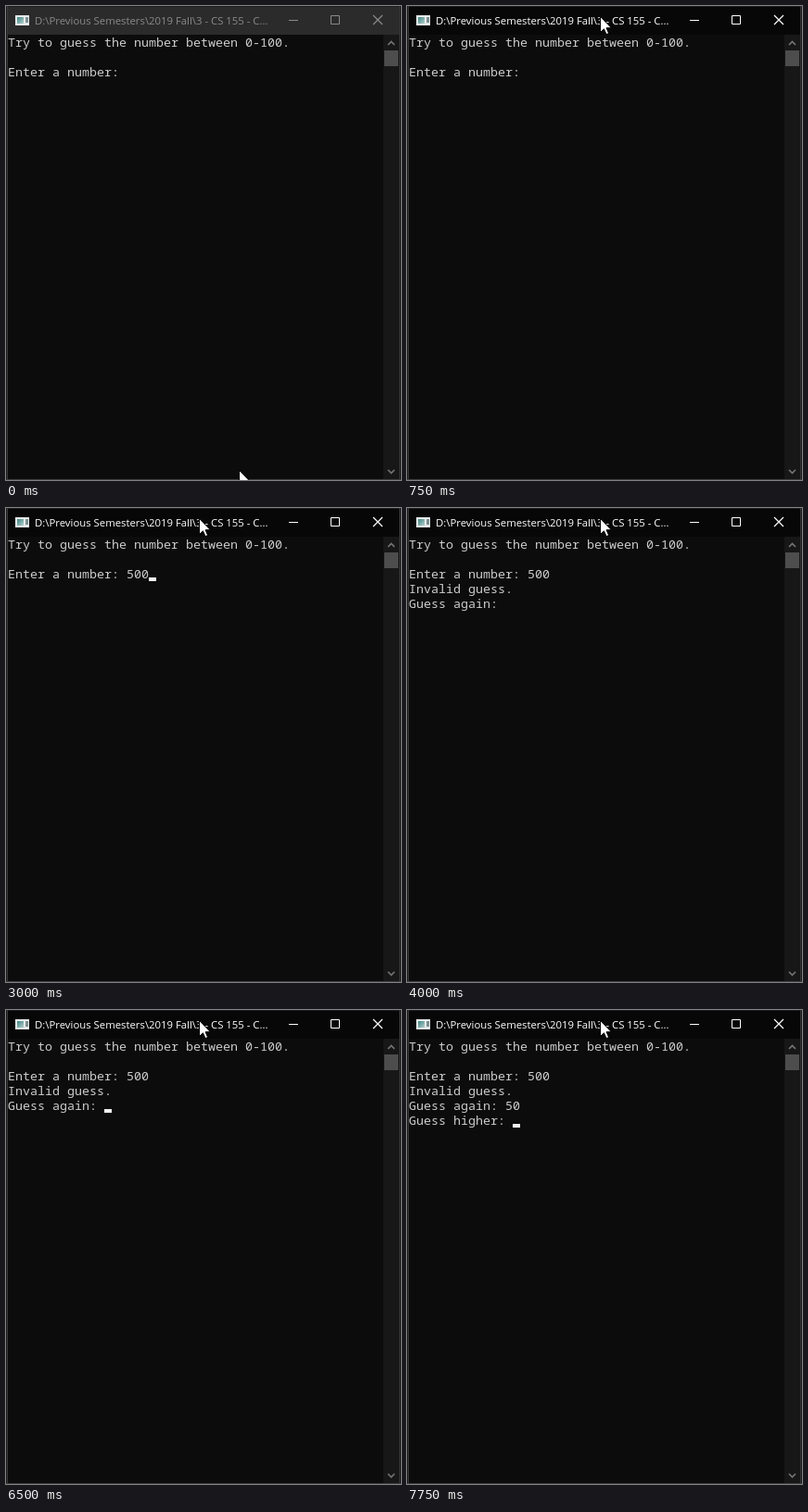
These frames come from a looping animation (426x512 px, 8 s). An HTML page:

```html
<!DOCTYPE html>
<html lang="en">
<head>
<meta charset="utf-8">
<title>Guess the number</title>
<style>
  html, body { margin: 0; width: 100%; height: 100%; overflow: hidden; background: #0c0c0c; }
  svg { display: block; width: 426px; height: 512px; }
  #title { font: 11.35px "Open Sans", "Noto Sans", sans-serif; }
  #lines text { font: 13.3333px "Noto Sans Mono", "DejaVu Sans Mono", monospace; fill: #ccc; white-space: pre; }
  .line { fill: none; stroke: currentColor; }
  #bar { fill: #2b2b2b; }
  #chrome { color: #8a8a8a; }
  .active #bar { fill: #070707; }
  .active #chrome { color: #fff; }
</style>
</head>
<body>
<svg id="stage" viewBox="0 0 426 512">
  <defs>
    <linearGradient id="teal" x2="1" y2="1">
      <stop stop-color="#3f8583"/>
      <stop offset="1" stop-color="#b4d0cd"/>
    </linearGradient>
  </defs>
  <rect width="426" height="512" fill="#1c1c1c"/>
  <rect x="1" width="1" height="512" fill="#3a3a3a"/>
  <rect x="424" width="1" height="512" fill="#333"/>
  <rect y="511" width="426" height="1" fill="#3a3a3a"/>
  <rect x="2" y="30" width="422" height="481" fill="#0c0c0c"/>
  <rect id="bar" x="2" y="1" width="422" height="30"/>

  <g id="icon">
    <rect x="10" y="10" width="15" height="11" fill="#e6eaea"/>
    <rect x="12" y="12" width="7" height="7" fill="url(#teal)"/>
    <rect x="21" y="12" width="3" height="6" fill="#7d9092"/>
  </g>

  <g id="chrome">
    <text id="title" x="31" y="20" fill="currentColor">D:\Previous Semesters\2019 Fall\3 - CS 155 - C...</text>
    <path class="line" d="M305 15.5h10M350.5 10.5h9v9h-9z"/>
    <path class="line" d="M396 10l10 10M406 10l-10 10" stroke-width="1.2"/>
  </g>

  <rect x="407" y="31" width="17" height="480" fill="#171717"/>
  <rect x="408" y="48" width="15" height="17" fill="#4d4d4d"/>
  <path d="M412 42l3.5-3.5 3.5 3.5M412 501l3.5 3.5 3.5-3.5" fill="none" stroke="#757575" stroke-width="1.6"/>

  <g id="lines"></g>
  <rect id="caret" width="8" height="4" fill="#f2f2f2"/>
  <path id="pointer" d="M.5.5V17.5L4.4 13.8 7 19.6 9.6 18.5 7.1 12.7H12.4Z" fill="#fff" stroke="#000"/>
</svg>

<script>
const LOOP = 8000, CELL = 8, ROW = 16, LEFT = 2, BASE = 44;
const $ = id => document.getElementById(id);

const pointerSteps = [[0, [251, 501]], [250, [187, 103]], [500, [208, 11]]];

const ask = ["Try to guess the number between 0-100.", "", "Enter a number: "];
const again = [...ask.slice(0, 2), "Enter a number: 500", "Invalid guess.", "Guess again: "];
const type = (lines, typed) => [...lines.slice(0, -1), lines.at(-1) + typed];

const textSteps = [
  [0, ask],
  [2500, type(ask, "5")],
  [2750, type(ask, "50")],
  [3000, type(ask, "500")],
  [3250, again],
  [7250, type(again, "5")],
  [7500, type(again, "50")],
  [7750, [...type(again, "50"), "Guess higher: "]]
];

const caretSteps = [
  [0, false], [1250, true], [1750, false], [2500, true], [4000, false],
  [4500, true], [5000, false], [5500, true], [6000, false], [6500, true]
];

const at = (steps, t) => steps.findLast(([start]) => start <= t)[1];

const rows = Array.from({ length: 6 }, (_, i) => {
  const row = document.createElementNS("http://www.w3.org/2000/svg", "text");
  row.setAttribute("x", LEFT);
  row.setAttribute("y", BASE + i * ROW);
  return $("lines").appendChild(row);
});

let shown;
function draw(t) {
  const lines = at(textSteps, t);
  if (lines !== shown) {
    rows.forEach((row, i) => row.textContent = lines[i] || "");
    $("caret").setAttribute("x", LEFT + lines.at(-1).length * CELL);
    $("caret").setAttribute("y", BASE - 1 + (lines.length - 1) * ROW);
    shown = lines;
  }
  $("caret").setAttribute("visibility", at(caretSteps, t) ? "visible" : "hidden");
  $("pointer").setAttribute("transform", `translate(${at(pointerSteps, t)})`);
  $("stage").classList.toggle("active", t >= 750);
}

const begin = performance.now();
function tick() {
  draw((performance.now() - begin) % LOOP);
  requestAnimationFrame(tick);
}
tick();
</script>
</body>
</html>
```
